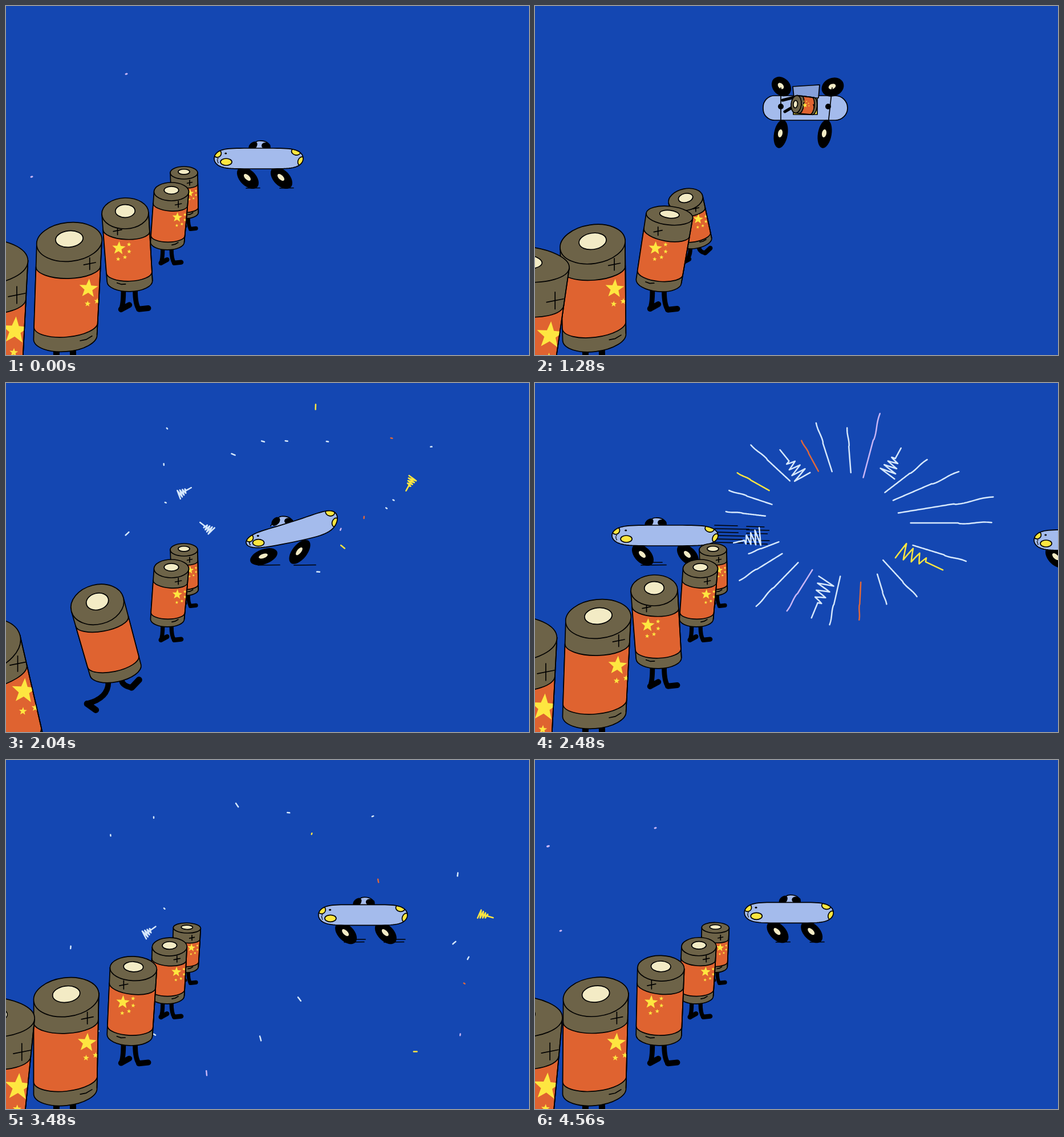
These frames come from a looping animation (917 by 611 pixels, 4.64 s). An HTML page with a canvas:

```html
<!DOCTYPE html>
<html lang="en">
<head>
<meta charset="utf-8">
<title>Charging queue</title>
<style>
html, body { margin: 0; width: 100%; height: 100%; overflow: hidden; background: #1447b2; }
canvas { display: block; }
</style>
</head>
<body>
<canvas id="stage" width="917" height="611"></canvas>
<script>
const ctx = document.getElementById('stage').getContext('2d');
const LOOP = 4640, TAU = Math.PI * 2;
const COL = { sky: '#1447b2', olive: '#6d6348', orange: '#df6330', cream: '#f3ebc5', car: '#a4bbec',
  hatch: '#86a0d8', ink: '#000', w: '#d6e8fc', y: '#fee640', o: '#e0683a', v: '#c9b6f6' };

// Drawings change in runs: first time, last time, count
const RUNS = [[120, 640, 6], [720, 1000, 4], [1160, 1640, 6], [1760, 2240, 7],
  [2320, 2840, 7], [2920, 3360, 5], [3480, 3960, 5], [4040, 4560, 6]];

// Places in the queue: lid centre, width, lid depth, lid tilt, base shift, label side, sideways lean
const PLACES = [
  { x: 312, y: 292, w: 48, lid: 11, tilt: 0, foot: 2, u: .7, lean: 10 },
  { x: 290, y: 325, w: 61, lid: 16, tilt: 0, foot: -7, u: .73, lean: -6 },
  { x: 209, y: 363, w: 82, lid: 27, tilt: -.03, foot: 8, u: .31, lean: 27 },
  { x: 111, y: 413, w: 115, lid: 34, tilt: -.1, foot: -7, u: .83, lean: -10 },
  { x: -44, y: 448, w: 165, lid: 40, tilt: -.03, foot: -10, u: .9, lean: 22 }];
const SEAT = { x: 458, y: 172, w: 31, h: 30, lid: 9, tilt: 0, foot: 0, u: .5, turn: -1.46, kick: 0, swing: 0 };
const WALK = 460, STARTS = [1100, 1420, 1700, 1770, 1930];
const JUMP = 720, LAND = 1160;

const clamp = x => Math.min(1, Math.max(0, x));
const lerp = (a, b, k) => a + (b - a) * k;
const ramp = (t, a, b) => clamp((t - a) / (b - a));
const smooth = k => k * k * (3 - 2 * k);
const ease = (t, a, b) => smooth(ramp(t, a, b));
const hash = n => { const s = Math.sin(n * 12.9898) * 43758.5453; return s - Math.floor(s); };
const blend = (a, b, k) => Object.fromEntries(Object.keys(a).map(key => [key, lerp(a[key], b[key], k)]));

function paint(fill, stroke = COL.ink, width = 1.7) {
  if (fill) { ctx.fillStyle = fill; ctx.fill(); }
  if (stroke) { ctx.strokeStyle = stroke; ctx.lineWidth = width; ctx.stroke(); }
}

function oval(x, y, rx, ry, angle, fill, stroke = null) {
  ctx.beginPath();
  ctx.ellipse(x, y, rx, ry, angle, 0, TAU);
  paint(fill, stroke);
}

function line(pts, color, width) {
  ctx.beginPath();
  pts.forEach(p => ctx.lineTo(...p));
  paint(null, color, width);
}

function star(x, y, r) {
  ctx.beginPath();
  for (let i = 0; i < 10; i++) {
    const a = i * TAU / 10 - 1.5, q = i % 2 ? r * .42 : r;
    ctx.lineTo(x + q * Math.cos(a), y + q * Math.sin(a));
  }
  ctx.closePath();
  paint(COL.y, null);
}

function leg(x, y, ax, ay, dir, w) {
  const thick = 3 + w * .07, toe = w * .2;
  ctx.beginPath();
  ctx.moveTo(x, y);
  ctx.quadraticCurveTo(x, lerp(y, ay, .75), ax, ay);
  paint(null, COL.ink, thick);
  line([[ax, ay], [ax + toe * Math.cos(dir), ay + toe * Math.sin(dir)]], COL.ink, thick * 1.15);
}

function battery(p, marked = true) {
  const { w, h, lid, tilt, foot, u } = p, base = w * .22;
  const rim = (x, y, r, a) => [-1, 1].map(s => [x + s * r * Math.cos(a), y + s * r * Math.sin(a)]);
  const [TL, TR] = rim(0, 0, w / 2, tilt), [BL, BR] = rim(foot, h, w * .485, tilt * .8);
  const side = (a, b, v) => [lerp(a[0], b[0], v), lerp(a[1], b[1], v)];
  const at = (a, v) => side(side(TL, BL, v), side(TR, BR, v), a);
  const arc = (l, r, sag, back = false) => ctx.ellipse((l[0] + r[0]) / 2, (l[1] + r[1]) / 2,
    Math.hypot(r[0] - l[0], r[1] - l[1]) / 2, sag, Math.atan2(r[1] - l[1], r[0] - l[0]),
    back ? Math.PI : 0, back ? 0 : Math.PI, back);

  ctx.save();
  ctx.translate(p.x, p.y);
  ctx.rotate(p.turn);

  const [ax, ay] = at(.36, 1), [bx, by] = at(.62, 1), shin = w * .4, hip = base * .9;
  if (p !== SEAT) {
    leg(ax, ay + hip, ax - w * (.05 + .2 * p.kick + .3 * p.swing), ay + hip + shin, lerp(-.5, 1.5, p.swing), w);
    leg(bx, by + hip, bx + w * (.08 + .12 * p.kick), by + hip + shin * (1 - .7 * p.kick), -.1 - .8 * p.kick, w);
  }

  ctx.beginPath();
  ctx.moveTo(...TR);
  ctx.lineTo(...BR);
  arc(BL, BR, base);
  ctx.lineTo(...TL);
  ctx.closePath();
  paint(COL.olive);

  ctx.beginPath();
  const low = at(0, .87);
  arc(at(0, .23), at(1, .28), base * .85);
  ctx.lineTo(...low);
  arc(low, at(1, .87), base * .85, true);
  ctx.closePath();
  paint(COL.orange);

  if (marked) {
    ctx.save();
    ctx.beginPath();
    ctx.moveTo(...TR);
    ctx.lineTo(...BR);
    arc(BL, BR, base);
    ctx.lineTo(...TL);
    ctx.clip();
    const [sx, sy] = at(u, .51), r = w * .15;
    star(sx, sy, r);
    for (let i = 0; i < 4; i++) {
      const a = -.35 + i * .66;
      star(sx + 1.55 * r * Math.cos(a), sy + 1.55 * r * Math.sin(a), r * .32);
    }
    const [x, y] = at(u, .25), [mx, my] = at(u, 1.03), q = w * .09, slope = u < .5 ? -.15 : .4;
    line([[x - q, y + q * .2], [x + q, y - q * .2]]);
    line([[x, y - q], [x, y + q]]);
    line([[mx - q, my + q * slope], [mx, my + q * .2], [mx + q, my - q * slope]]);
    ctx.restore();
    line([TR, BR]);
  }
  oval(0, 0, w / 2, lid, tilt, COL.olive, COL.ink);
  oval(0, -lid * .15, w * .21, lid * .42, tilt, COL.cream, COL.ink);
  ctx.restore();
}

// How far the waiting line leans, 0 to 1
function sway(t) {
  const hold = ease(t, 0, 520) - ease(t, 1360, 1840) + .55 * (ease(t, 2500, 3300) - ramp(t, 4560, LOOP));
  const bob = t < 520 ? 0 : (1 - Math.cos((t - 520) / 760 * TAU)) / 2;
  return hold * (1 - .3 * bob);
}

function pose(i, t) {
  const s = PLACES[Math.min(i, 4)], k = sway(t), lean = s.lean * k, out = i > 4 ? 1 : 0;
  return { x: s.x + lean - 150 * out, y: s.y + 4 * k + 40 * out, w: s.w, h: 1.45 * s.w - 4 * k,
    lid: s.lid - .4 * Math.max(lean, 0), tilt: s.tilt + .005 * lean, foot: s.foot - lean, u: s.u,
    turn: 0, kick: 0, swing: 0 };
}

// Lean back, crouch, then stride into the next place
function stride(from, to, s) {
  const move = ease(s, .3, .9), bend = Math.sin(s * Math.PI), back = bend * (1 - move);
  const p = blend(from, to, move), w = p.w;
  p.x -= .4 * w * back;
  p.y += .2 * w * back;
  p.h *= 1 - .18 * bend;
  p.lid += .06 * w * bend;
  p.tilt -= .22 * bend;
  p.foot += .35 * w * bend;
  p.kick = bend;
  p.swing = bend * move;
  return p;
}

function queue(t) {
  if (t < JUMP) battery(pose(0, t));
  STARTS.forEach((start, i) => {
    const s = ramp(t, start, start + WALK), p = stride(pose(i + 1, t), pose(i, t), s);
    p.u = PLACES[s < .6 ? Math.min(i + 1, 4) : i].u;
    battery(p, s < .6 || s > .85);
  });
}

function jumper(t) {
  const s = ramp(t, JUMP, LAND), p = blend(pose(0, t), SEAT, smooth(s));
  p.y -= Math.sin(s * Math.PI) * 50;
  p.kick = Math.sin(s * Math.PI);
  battery(p);
}

function wheel(x, y, rx, ry, angle) {
  oval(x, y, rx, ry, angle, COL.ink);
  oval(x - 1, y - 1, rx * .33, ry * .28, angle, COL.cream);
}

// sag: resting weight; rear: tail thrown up; lag: wheels trailing; stretch: full speed
function car({ x, drop = 0, sag = 0, rear = 0, lag = 0, stretch = 0 }) {
  const half = 78 + 3 * sag + 2 * rear + 15 * stretch, thick = 18 - 3 * sag, tilt = -21 * rear;
  const cy = 267 + drop + 17 * sag - 6 * rear;
  const mid = u => cy + tilt * u - (8 * sag + 3 * rear) * u * u;
  const spot = (u, dy) => [x + u * half, mid(u) + dy * (1 + .25 * rear * u)];
  const turn = 45 * (1 - sag) - 65 * rear;

  [-19 - 22 * sag - 30 * rear - 20 * lag, 40 - 7 * sag - 26 * rear].forEach((d, n) => {
    const wx = x + d, g = 12 + (45 - Math.abs(turn)) * .28;
    wheel(wx, 301 + 6 * sag + 3 * rear + n * tilt * .4 + drop / 2, 23 - 2 * sag + 2 * rear, 14 - 2 * sag - rear,
      (turn + n * tilt * 1.5) * Math.PI / 180);
    line([[wx - g + 9, 319], [wx + g + 9 + 20 * lag, 318.5]]);
    if (lag > .2) line([[wx + 16, 314], [wx + 34, 314]]);
  });
  if (stretch) for (let i = 0; i < 6; i++) {
    const sx = x + half - 6, sy = cy - 18 + i * 6, len = 40 * stretch;
    line([[sx, sy], [sx + len + 22 * hash(i), sy + 1]]);
    line([[sx + len * 1.4, sy + 2], [sx + len * 1.9 + 20 * hash(i + 9), sy + 3]]);
  }

  const hx = x + 5 - 18 * Math.max(rear, stretch), top = mid((hx - x) / half) - thick;
  ctx.beginPath();
  ctx.moveTo(hx - 24, top + 4);
  ctx.quadraticCurveTo(hx - 12, top - 13, hx - 4, top - 13);
  ctx.quadraticCurveTo(hx + 16, top - 14, hx + 15, top + 4);
  paint(COL.car);
  oval(hx - 15, top - 4, 9, 6, -.8, COL.ink);
  oval(hx + 8, top - 4, 8, 6, .2, COL.ink);

  const edge = [];
  for (let i = 0; i <= 80; i++) {
    const c = Math.cos(i / 80 * TAU), u = Math.sign(c) * Math.pow(Math.abs(c), .6);
    edge.push(spot(u, (i < 40 ? 1 : -1) * thick * Math.sqrt(Math.max(0, 1 - Math.pow(u, 6)))));
  }
  ctx.save();
  ctx.beginPath();
  edge.forEach(p => ctx.lineTo(...p));
  ctx.closePath();
  paint(COL.car, null);
  ctx.clip();
  const lamp = (u, dy, rx, ry, a) => oval(...spot(u, dy), rx, ry, a, COL.y, COL.ink);
  lamp(-.93, -9, 7, 7, 0);
  lamp(-.73, 6, 10, 6, 0);
  lamp(.84, -12, 8, 6, .2);
  lamp(.96, 5, 6, 8, .3);
  oval(...spot(-.74, -9), 2, 1.6, 0, COL.ink);
  for (let i = 0; i < 4; i++) oval(...spot(-.95 + .06 * hash(i + 3), i * 2.4), 1, 1, 0, COL.ink);
  ctx.restore();
  line(edge);
}

function leaving(t) {
  const rush = Math.max(0, t - 2000) / 480, speed = ramp(t, 2240, 2480);
  car({ x: 443 + 23 * ease(t, 0, 520) + 35 * ease(t, 1600, 2000) - 273 * rush ** 3,
    sag: ease(t, 0, 520) - ease(t, 1600, 1840), rear: ease(t, 1700, 2000) - ease(t, 2040, 2400),
    lag: speed, stretch: speed });
}

function arriving(t) {
  const left = 1 - ramp(t, 2480, LOOP);
  car({ x: 443 + 510 * left ** 1.65, drop: 8 * left, lag: left });
}

function underside(t, up) {
  ctx.save();
  ctx.translate(0, 180 + (1 - up) * 80);
  ctx.scale(1, .5 + .5 * up);
  ctx.translate(0, -180);
  ctx.beginPath();
  ctx.roundRect(400, 157, 148, 43, [24, 26, 26, 24]);
  paint(COL.car);
  wheel(432, 141, 19, 15, .8);
  wheel(522, 142, 20, 16, -.4);
  [431, 514].forEach((x, i) => {
    wheel(x - i * 6, 224, 12, 25, .17);
    line([[x + i * 7, 143], [x, 207]]);
    oval(x, 176, 5, 5, 0, COL.ink);
  });
  ctx.beginPath();
  ctx.rect(453, 160, 42, 30);
  paint(COL.y);
  ctx.beginPath();
  [[452, 141], [499, 138], [497, 161], [454, 160]].forEach(p => ctx.lineTo(...p));
  ctx.closePath();
  paint(COL.hatch);
  if (t >= LAND) {
    line([[454, 160], [434, 165]], COL.ink, 5);
    line([[450, 178], [438, 185]], COL.ink, 5);
    battery(SEAT);
  }
  ctx.restore();
}

// Stroke from p to q, shown between shares a and b; zig is the tooth height
function streak(p, q, a, b, color, zig = 0) {
  const dx = q[0] - p[0], dy = q[1] - p[1], d = Math.hypot(dx, dy) || 1, pts = [];
  for (let i = 0; i <= 48; i++) {
    const u = lerp(a, b, i / 48), tooth = Math.abs(u * 6 % 1 * 2 - 1) * 2 - 1;
    const off = u < .6 ? zig * tooth * (1 - u) : zig ? 0 : d * .01 * Math.sin(u * 12);
    pts.push([p[0] + dx * u - dy / d * off, p[1] + dy * u + dx / d * off]);
  }
  line(pts, color, 2.5);
}

function burst(t) {
  if (t < 2320 || t >= 2960) return;
  const grow = ramp(t, 2280, 2480), fade = ramp(t, 2480, 2960);
  const k = (.35 + .65 * grow) * (1 + .35 * fade), n = 26, hues = 'wwywwowwvwwww';
  for (let i = 0; i < n; i++) {
    const a = (i + .5 * hash(i)) / n * TAU, right = Math.max(0, Math.cos(a));
    const ray = (rx, ry, a) => [530 + rx * k * Math.cos(a), 245 + ry * k * Math.sin(a)];
    const inner = .85 + .3 * hash(i + 40), outer = .75 + .25 * hash(i + 80);
    const from = ray(125 * inner, 100 * inner, a);
    const to = ray((210 + 80 * right) * outer, 205 * outer, a + .12 * Math.sin(a));
    streak(from, to, fade, grow, COL[hues[i % hues.length]], i % 5 === 2 ? 16 : 0);
  }
}

// Bits fly out of the middle until t1, then die one by one
function sparks(t, seed, x, y, rx, ry, t0, t1, end) {
  if (t < t0 || t >= end) return;
  const s = ramp(t, t0, t1), k = .2 + .8 * (1 - (1 - s) ** 2), hues = 'wwwywwvwow';
  for (let i = 0; i < 24; i++) {
    const h = hash(seed + i), far = Math.sqrt(.15 + .85 * hash(seed + i + 50));
    if (t >= lerp(t1 + 40, end, h)) continue;
    const a = i * 2.4, px = x + rx * far * k * Math.cos(a), py = y + ry * far * k * Math.sin(a);
    const zig = i % 9 === 4, len = zig ? 26 : 2 + 7 * h * h;
    const size = (len + 80 * (1 - s) * Math.min(1, s * 4)) / 2, dir = a + h * 3 * s;
    const dx = Math.cos(dir) * size, dy = Math.sin(dir) * size;
    streak([px - dx, py - dy], [px + dx, py + dy], 0, 1, COL[hues[i % 10]], zig ? 8 : 0);
  }
}

function embers(t) {
  if (t < 120 || t > 3900) [[211, 119], [45, 299]].forEach(([x, y]) => oval(x, y, 2.5, 1.6, -.2, COL.v));
  if (t > 4000) oval(23, 151, 3, 1.8, -.3, COL.v);
}

function draw(t) {
  ctx.fillStyle = COL.sky;
  ctx.fillRect(0, 0, 917, 611);
  ctx.lineCap = ctx.lineJoin = 'round';
  sparks(t, 7, 475, 205, 350, 190, 1440, 2000, 2480);
  sparks(t, 90, 460, 320, 450, 255, 2560, 3480, 4480);
  embers(t);
  if (t >= 800 && t < 1600) underside(t, Math.min(ramp(t, 760, 1000), 1 - ramp(t, 1400, 1600)));
  else if (t < 2640) leaving(t);
  if (t >= 2480) arriving(t);
  queue(t);
  if (t >= JUMP && t < LAND) jumper(t);
  burst(t);
}

// Latest change at or before t, on a 40 ms grid
function held(t) {
  let at = 0;
  for (const [a, b, n] of RUNS) for (let i = 0; i < n; i++) {
    const s = Math.round(lerp(a, b, i / (n - 1)) / 40) * 40;
    if (s <= t) at = s;
  }
  return at;
}

let shown = -1;
const start = performance.now();
function frame(now) {
  const t = held(Math.max(0, now - start) % LOOP);
  if (t !== shown) draw(shown = t);
  requestAnimationFrame(frame);
}
frame(start);
</script>
</body>
</html>
```
